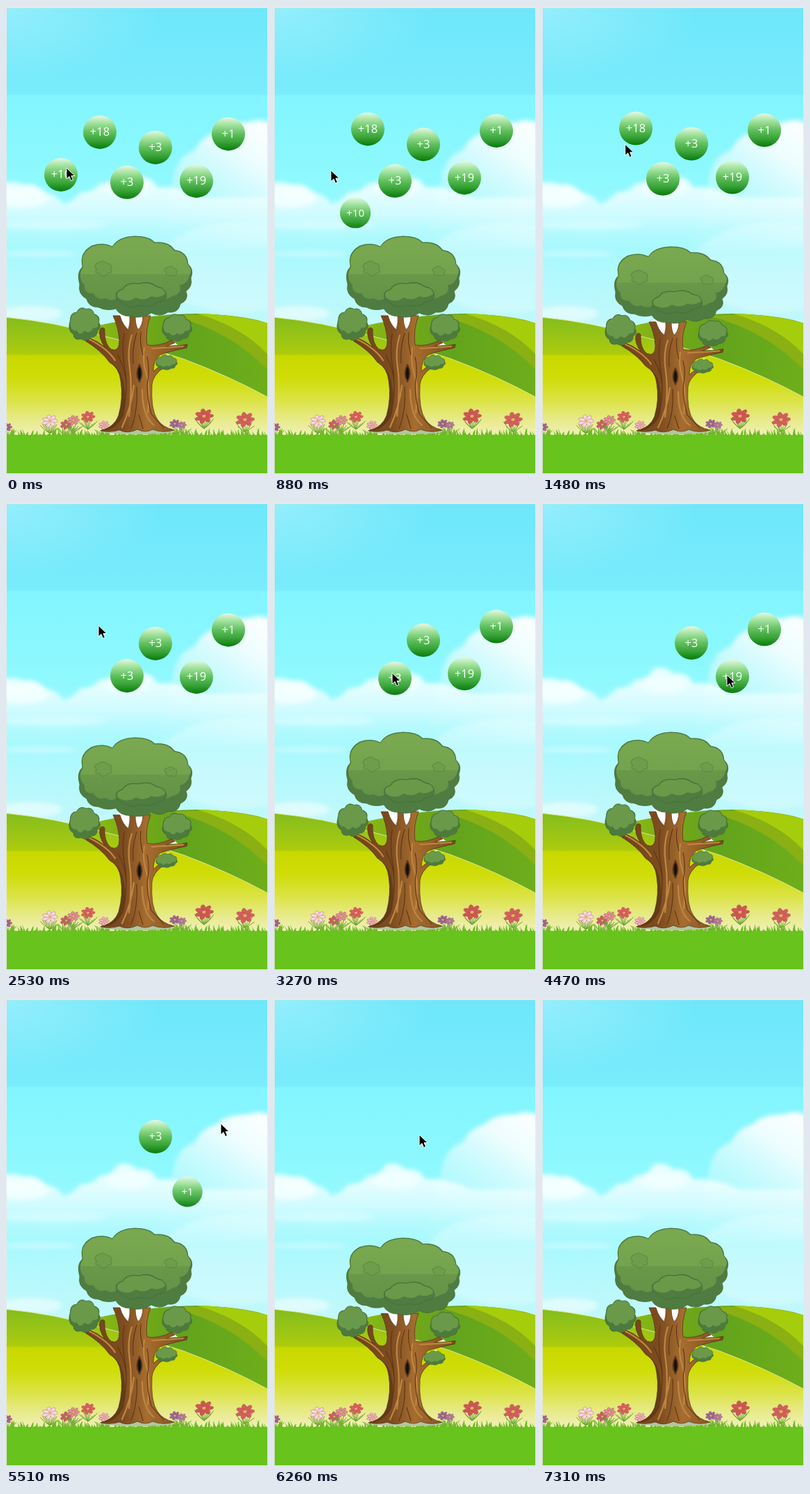
An HTML page for the animation above (7.61 s loop, 377 by 671 pixels).

```html
<!DOCTYPE html>
<html lang="en">
<head>
<meta charset="utf-8">
<title>Energy tree</title>
<style>
html, body { margin: 0; width: 100%; height: 100%; overflow: hidden; background: #fff; }
svg { display: block; width: 100%; height: 100%; }
text { font: 400 16.5px "Open Sans", "Noto Sans", sans-serif; fill: #fff; text-anchor: middle; }
</style>
</head>
<body>
<svg viewBox="0 0 377 671" preserveAspectRatio="none">
<defs>
  <linearGradient id="sky" x2="0" y2="1">
    <stop stop-color="#6de7fb"/><stop offset=".27" stop-color="#7aecfc"/>
    <stop offset=".275" stop-color="#82f5fe"/><stop offset=".55" stop-color="#8ff9fe"/>
    <stop offset=".72" stop-color="#a4f9fe"/><stop offset="1" stop-color="#c3f8fb"/>
  </linearGradient>
  <radialGradient id="glow" cx="0" cy="0" r=".6">
    <stop stop-color="#b5f3fc" stop-opacity=".55"/><stop offset="1" stop-color="#b5f3fc" stop-opacity="0"/>
  </radialGradient>
  <linearGradient id="cloudLeft" x2="0" y2="1">
    <stop stop-color="#fff" stop-opacity=".8"/><stop offset=".25" stop-color="#f4feff" stop-opacity=".85"/>
    <stop offset=".55" stop-color="#e0fcfe" stop-opacity=".75"/><stop offset="1" stop-color="#c4fafd" stop-opacity="0"/>
  </linearGradient>
  <linearGradient id="cloudRight" x1="1" y1="0" x2=".35" y2="1">
    <stop stop-color="#fff"/><stop offset=".3" stop-color="#f3fdfe" stop-opacity=".95"/>
    <stop offset=".6" stop-color="#d4fbfd" stop-opacity=".75"/><stop offset="1" stop-color="#bffafd" stop-opacity=".2"/>
  </linearGradient>
  <linearGradient id="field" gradientUnits="userSpaceOnUse" x1="0" x2="0" y1="446" y2="616">
    <stop stop-color="#84bd1c"/><stop offset=".18" stop-color="#9bc515"/>
    <stop offset=".31" stop-color="#adcb0b"/><stop offset=".33" stop-color="#c8d900"/>
    <stop offset=".52" stop-color="#d0dd08"/><stop offset=".7" stop-color="#dbe344"/>
    <stop offset=".86" stop-color="#e7ea88"/><stop offset="1" stop-color="#f1f0b9"/>
  </linearGradient>
  <linearGradient id="hill">
    <stop stop-color="#8cba14"/><stop offset=".3" stop-color="#72a819"/>
    <stop offset=".5" stop-color="#62a31d"/><stop offset="1" stop-color="#6eae1b"/>
  </linearGradient>
  <linearGradient id="ball" x2="0" y2="1">
    <stop stop-color="#e4f9e2"/><stop offset=".22" stop-color="#a5e3a1"/>
    <stop offset=".5" stop-color="#60c05d"/><stop offset=".75" stop-color="#38a338"/>
    <stop offset="1" stop-color="#087b0b"/>
  </linearGradient>
  <linearGradient id="bark">
    <stop stop-color="#70431a"/><stop offset=".38" stop-color="#7d4c20"/>
    <stop offset=".6" stop-color="#a66d30"/><stop offset="1" stop-color="#7b4a1e"/>
  </linearGradient>
  <linearGradient id="leaf" x2="0" y2="1">
    <stop stop-color="#7aa950"/><stop offset=".58" stop-color="#73a34d"/>
    <stop offset=".6" stop-color="#6a984a"/><stop offset="1" stop-color="#659347"/>
  </linearGradient>
  <filter id="soft" x="-10%" y="-20%" width="120%" height="140%"><feGaussianBlur stdDeviation="3"/></filter>
</defs>

<rect y="2" width="377" height="460" fill="url(#sky)"/>
<rect y="2" width="377" height="180" fill="url(#glow)"/>
<g filter="url(#soft)">
  <path fill="url(#cloudRight)" d="M240 250Q245 215 272 207Q282 186 302 182Q315 167 348 167Q365 160 385 170V345H215Z"/>
  <path fill="url(#cloudLeft)" d="M-10 255Q8 249 25 256Q44 252 56 268Q72 269 83 284Q100 278 107 267Q126 268 134 255Q153 254 160 240Q174 233 190 246Q210 243 217 260Q250 258 285 275H385V350H-10Z"/>
  <g fill="#fff">
    <ellipse cx="24" cy="274" rx="38" ry="16" opacity=".6"/><ellipse cx="175" cy="262" rx="32" ry="14" opacity=".35"/>
    <ellipse cx="70" cy="314" rx="75" ry="7" opacity=".3"/><ellipse cx="50" cy="355" rx="55" ry="4" opacity=".35"/>
    <ellipse cx="35" cy="441" rx="46" ry="11" opacity=".5"/><ellipse cx="335" cy="375" rx="120" ry="65" opacity=".28"/>
  </g>
</g>

<path fill="url(#hill)" d="M125 460Q200 442 275 441Q330 442 377 455V580H125Z"/>
<path fill="#8ab014" d="M240 444Q330 438 377 455V522Q325 467 240 444Z"/>
<path fill="#a5cd0b" d="M275 441Q330 442 377 455V500Q340 460 275 441Z"/>
<path fill="url(#field)" stroke="#e2e690" d="M-2 446Q70 453 136 472Q200 488 255 506Q320 530 379 562V630H-2Z"/>
<g id="meadow"></g>
<path fill="#68c31d" d="M0 615H377V671H0Z"/>
<ellipse cx="190" cy="610" rx="52" ry="4" fill="#b3c4a0"/>

<g id="tree" stroke-linejoin="round" stroke-linecap="round" stroke-width=".7">
  <path fill="#fff" d="M160 440H204L197 466H171ZM228 487L240 480 247 486ZM217 509L233 499 242 507Z"/>
  <path fill="url(#bark)" stroke="#4f2f12" d="M136 609Q156 604 162 587Q169 562 165 537Q163 519 149 511Q137 494 114 480L118 475Q133 481 142 489Q133 476 135 464Q138 459 142 463Q141 484 151 492Q163 497 163 480Q162 461 154 444H164Q168 458 176 464Q179 454 178 444H186Q186 457 190 464Q197 458 197 444H208Q200 465 203 486Q219 489 239 479L243 483 231 488Q246 489 261 485L260 490Q232 496 222 500Q212 507 212 524Q218 518 224 515L227 518Q211 530 210 543Q208 579 218 593Q225 604 242 608Q225 613 211 607Q201 613 189 607Q175 614 163 608Q150 612 136 609Z"/>
  <path fill="#593615" opacity=".7" d="M149 511Q165 519 169 540Q175 570 166 592Q160 603 146 608L137 608Q156 604 162 587Q169 562 165 537Q163 519 149 511Z"/>
  <path fill="none" stroke="#c08641" stroke-width="2.2" d="M181 472Q174 492 178 519T177 588M199 490Q196 509 202 528T204 583M184 544Q180 576 167 604M196 550Q196 588 213 601M120 478Q146 491 157 508M210 491Q228 490 255 488"/>
  <path fill="none" stroke="#5d3716" stroke-width="1.1" d="M170 470Q166 493 171 520T168 588L150 606M188 469Q181 491 183 512M194 468Q192 483 197 500M188 546Q190 580 180 606M203 503Q207 520 204 536T209 585L227 605M191 586L197 606M161 501Q172 520 173 542"/>
  <path fill="#16110d" stroke="#60391a" stroke-width="2" d="M192 514Q199 527 192 539Q185 527 192 514Z"/>

  <path fill="#4f7c40" stroke="#46692f" d="M110 374Q105 354 123 344Q139 338 153 345Q161 331 185 330Q206 330 214 339Q234 337 243 350Q261 352 262 370Q271 378 266 390Q269 402 259 409Q264 421 251 427Q248 441 233 439Q222 447 209 440Q198 449 179 445Q164 445 158 434Q145 438 133 432Q119 432 116 420Q103 413 106 399Q101 382 110 374Z"/>
  <path fill="url(#leaf)" d="M111 374Q106 355 124 345Q139 339 153 346Q162 332 185 331Q206 331 213 340Q233 338 242 351Q260 353 261 370Q269 378 264 386Q261 399 250 400Q254 413 239 416Q228 424 218 415H163Q154 426 143 419Q131 423 126 412Q112 413 113 400Q102 389 111 374Z"/>
  <path fill="#4f7c40" stroke="#446b35" d="M160 421Q154 410 167 406Q174 395 191 398Q206 393 217 402Q231 404 231 417Q225 426 218 424Q208 434 193 429Q178 437 160 421Z"/>
  <path fill="#6a994a" d="M161 418Q157 410 168 407Q175 396 191 399Q206 395 216 403Q229 405 229 413Q218 420 209 416Q198 424 187 418Q174 427 161 418Z"/>
  <g fill="#6e9e4b" stroke="#517d3d">
    <path d="M130 377Q124 371 133 368Q139 363 146 369Q154 370 151 377Q155 383 147 383Q139 391 135 383Q126 385 130 377Z"/>
    <path d="M230 381Q225 377 232 375Q237 371 242 376Q249 378 245 383Q245 389 238 386Q230 389 230 381Z"/>
  </g>
  <g id="bushes"></g>
</g>

<g id="balls"></g>
<path id="cursor" fill="#000" stroke="#fff" d="M0 0V16L4 12.5 6.5 18.5 9.5 17.3 7 11.5H12Z"/>
<path fill="#e9e9e9" d="M0 0H377V671H0ZM1 3V670H376V3Z" fill-rule="evenodd"/>
</svg>

<script>
const LOOP = 7610, FIRST = 130, STEP = 149.58;
const FLIGHT = 500, BOUNCE = 450, GOAL = [186, 401], GROUND = 611;
const $ = id => document.getElementById(id);
const clamp = v => Math.max(0, Math.min(1, v));
const mix = (a, b, p) => a + (b - a) * p;

let seed = 7;
const random = () => (seed = seed * 16807 % 2147483647) / 2147483647;

function flower(x, y, size, color) {
  let leaves = "", petals = "";
  for (let i = 0; i < 9; i++)
    leaves += `M${x} ${y + 18}q${(i - 4) * 2} -5 ${(i - 4) * 3.4} ${-7 - random() * 9}`;
  for (let i = 0; i < 7; i++)
    petals += `<ellipse cy="${-size * .6}" rx="${size * .3}" ry="${size * .55}" transform="rotate(${i * 360 / 7})"/>`;
  return `<path d="${leaves}" fill="none" stroke="#6f9f3c"/>
    <g transform="translate(${x} ${y}) rotate(-12) scale(1 .78)">
      <g fill="${color}" stroke="#a8454c" stroke-width=".4">${petals}</g>
      <circle r="${size * .22}" fill="#e3b45b"/></g>`;
}

function grass() {
  let d = "";
  for (let x = -2; x < 379; x += 2.5) {
    const h = 3 + random() * 10, lean = random() * 10 - 5;
    d += `M${x} 617q0 ${-h / 2} ${lean} ${-h}q${2 - lean / 2} ${h / 2} ${3 - lean} ${h}z`;
  }
  return `<path d="${d}" fill="#6abb23"/>`;
}

$("meadow").innerHTML = [
  [1, 604, 7, "#9a6696"], [63, 595, 10, "#f3d9e0"], [87, 600, 8, "#c8606a"], [97, 594, 8, "#dd9297"],
  [118, 589, 9, "#d9605f"], [141, 601, 7, "#efb6c3"], [243, 599, 7, "#94699d"], [253, 601, 6, "#a981a8"],
  [285, 588, 12, "#cf5654"], [344, 593, 12, "#d2605d"]
].map(f => flower(...f)).join("") + grass();

const bush = (x, y, w, h) => `<g transform="translate(${x} ${y}) scale(${w} ${h})" stroke-width=".03">
  <path fill="#4e7b3d" stroke="#426532" d="M-.9 -.2Q-.9 -.7 -.5 -.7Q-.3 -1.1 .1 -.9Q.5 -1 .6 -.6Q1 -.5 .9 -.1Q1.1 .2 .8 .4Q.8 .8 .4 .8Q.1 1.1 -.2 .9Q-.7 1 -.7 .6Q-1.1 .4 -.9 -.2Z"/>
  <path fill="#6a994a" d="M-.87 -.2Q-.85 -.65 -.48 -.68Q-.3 -1.05 .1 -.87Q.5 -.95 .57 -.58Q.95 -.45 .86 -.1Q.9 .3 .55 .22Q.3 .65 0 .4Q-.3 .75 -.48 .4Q-.95 .4 -.87 -.2Z"/></g>`;
$("bushes").innerHTML = bush(113, 456, 23, 24) + bush(246, 461, 22, 20) + bush(231, 511, 16, 11);

// label, x, y, moment of the click, bob period, moment of the lowest point
const balls = [
  ["+10", 79, 239, 700, 2350, 2430], ["+18", 135, 178, 1950, 2350, 2430],
  ["+3", 174, 250, 3450, 3300, 3500], ["+19", 274, 248, 4475, 2350, 2430],
  ["+1", 320, 180.5, 5295, 2350, 2430], ["+3", 215, 200, 5610, 2350, 2430]
].map(([label, x, y, click, period, low]) => {
  const node = document.createElementNS("http://www.w3.org/2000/svg", "g");
  node.innerHTML = `<circle r="24" fill="url(#ball)"/><text y="5.5">${label}</text>`;
  $("balls").append(node);
  return { node, x, y, click, period, low };
});

// time, x, y of the pointer
const pointer = [
  [0, 87, 232], [700, 84, 235], [1030, 80, 236], [1480, 120, 198], [1780, 133, 177], [2530, 133, 177],
  [3120, 170, 245], [3600, 170, 245], [4320, 266, 248], [4650, 266, 248], [5210, 309, 180],
  [5520, 309, 180], [5610, 209, 196], [6570, 209, 196], [6860, 262, 583], [7020, 262, 583], [7160, 278, 637]
];

function draw(t) {
  let squash = 0;
  for (const { node, x, y, click, period, low } of balls) {
    const p = clamp((t - click) / FLIGHT);
    const bobTime = Math.min(t, click);
    const startY = y + 3 * Math.cos(2 * Math.PI * (bobTime - low) / period);
    node.setAttribute("transform", `translate(${mix(x, GOAL[0], p)} ${mix(startY, GOAL[1], p)}) scale(${1 - .22 * p})`);
    node.setAttribute("opacity", 1 - .1 * p);
    node.setAttribute("visibility", p < 1 ? "visible" : "hidden");
    squash = Math.max(squash, Math.sin(Math.PI * clamp((t - click - FLIGHT) / BOUNCE)));
  }
  $("tree").setAttribute("transform", `translate(0 ${GROUND}) scale(1 ${1 - .057 * squash}) translate(0 ${-GROUND})`);

  const next = pointer.findIndex(k => k[0] > t);
  const b = pointer[next < 0 ? pointer.length - 1 : next];
  const a = next > 0 ? pointer[next - 1] : b;
  const p = a === b ? 0 : (t - a[0]) / (b[0] - a[0]);
  $("cursor").setAttribute("transform", `translate(${mix(a[1], b[1], p)} ${mix(a[2], b[2], p)})`);
  $("cursor").setAttribute("visibility", t < 7300 ? "visible" : "hidden");
}

// The motion advances in even steps and rests on the last one.
const stepped = t => t < FIRST ? 0 : Math.min(7310, FIRST + Math.floor((t - FIRST + 6) / STEP) * STEP);

const start = performance.now();
let shown = -1;
function tick() {
  const t = stepped((performance.now() - start) % LOOP);
  if (t !== shown) draw(shown = t);
  requestAnimationFrame(tick);
}
tick();
</script>
</body>
</html>
```
